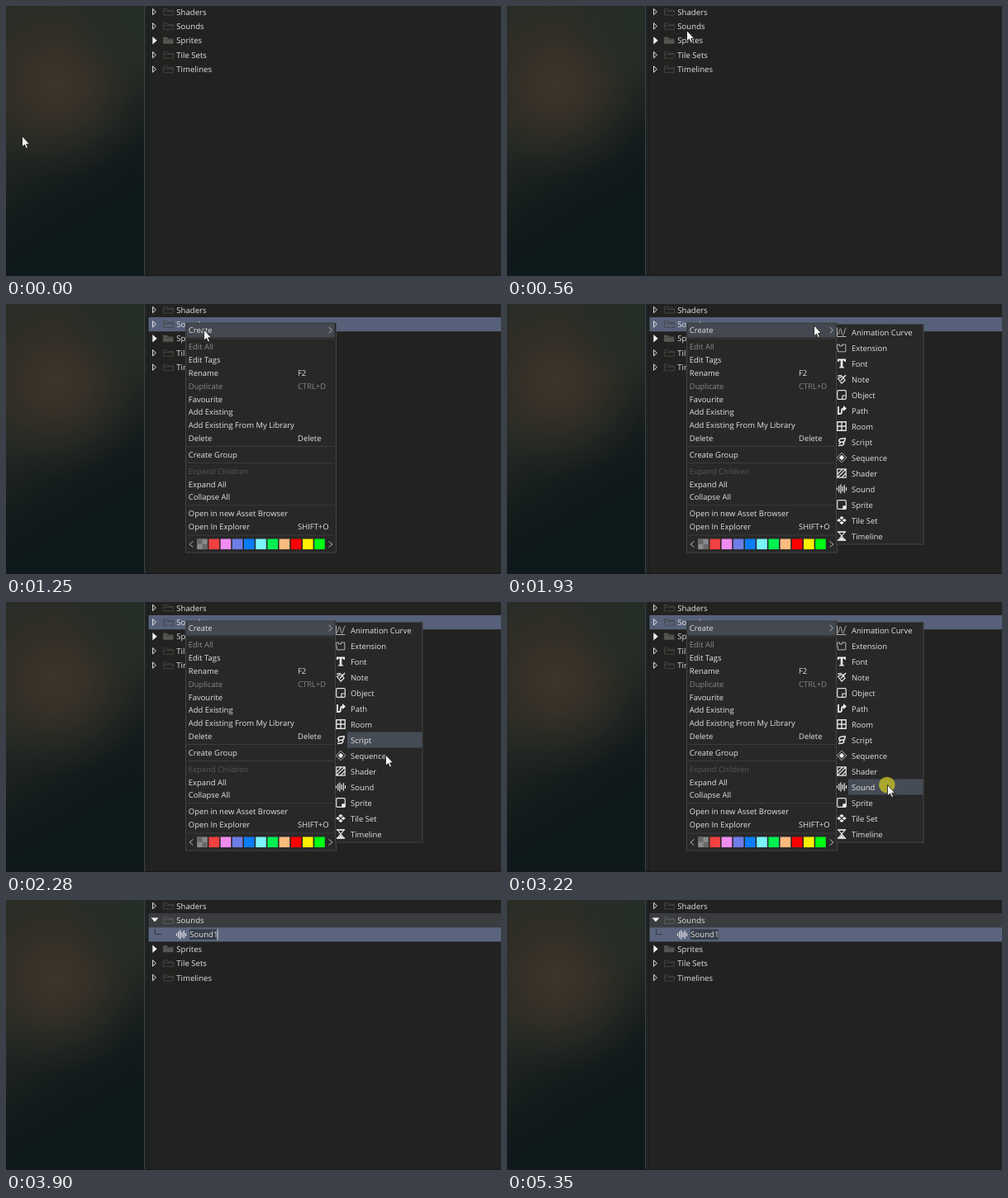
An HTML page for the animation above (5560 ms loop, 599 by 327 pixels).

```html
<!DOCTYPE html>
<html lang="en">
<head>
<meta charset="utf-8">
<title>Asset browser</title>
<style>
html, body { margin: 0; width: 100%; height: 100%; overflow: hidden; background: #222220; }
svg { display: block; width: 599px; height: 327px; }
text { font: 9.45px 'Open Sans', 'Noto Sans', sans-serif; text-rendering: geometricPrecision; white-space: pre; }
#closedTree text, #openTree text { font-size: 9.6px; }
.line { fill: none; stroke: #e4e4e4; stroke-width: 1.2; }
.solid { fill: #f0f0f0; }
.thin { fill: none; stroke: #b4b4b4; stroke-width: 1; }
</style>
</head>
<body>
<svg id="stage" viewBox="0 0 599 327" xmlns="http://www.w3.org/2000/svg">
  <defs>
    <linearGradient id="base" gradientUnits="userSpaceOnUse" x1="30" y1="40" x2="150" y2="240">
      <stop offset="0" stop-color="#2a2c26"/>
      <stop offset=".35" stop-color="#262a25"/>
      <stop offset=".6" stop-color="#1a211f"/>
      <stop offset=".8" stop-color="#121a1b"/>
      <stop offset="1" stop-color="#0e191b"/>
    </linearGradient>
    <radialGradient id="warm" gradientUnits="userSpaceOnUse" cx="60" cy="94" r="118">
      <stop offset="0" stop-color="#3d3529"/>
      <stop offset=".35" stop-color="#383128" stop-opacity=".85"/>
      <stop offset="1" stop-color="#2a2b25" stop-opacity="0"/>
    </radialGradient>
    <radialGradient id="green" gradientUnits="userSpaceOnUse" cx="160" cy="15" r="90">
      <stop offset="0" stop-color="#252e28" stop-opacity=".9"/>
      <stop offset="1" stop-color="#252e28" stop-opacity="0"/>
    </radialGradient>
  </defs>
  <rect width="599" height="327" fill="#222220"/>
  <rect width="168" height="327" fill="url(#base)"/>
  <rect width="168" height="327" fill="url(#warm)"/>
  <rect width="168" height="327" fill="url(#green)"/>
  <rect x="167" width="1" height="327" fill="#3c4242"/>
  <rect x="168" width="4" height="327" fill="#202424"/>
  <rect x="171.5" width="1" height="327" fill="#191b1b"/>
  <rect y="326" width="599" height="1" fill="#1a171b"/>
  <g id="closedTree"></g>
  <g id="openTree"></g>
  <g id="menu"></g>
  <g id="submenu"></g>
  <circle id="press" r="9.8" fill="#cfc81e" fill-opacity=".73"/>
  <path id="cursor" d="M0 0V13.2L3 10.5 5 15 7 14.2 5.2 9.8H9Z" fill="#f4f4f4" stroke="#111" stroke-width=".8"/>
</svg>
<script>
const LOOP = 5560, STEP = 70;
const $ = id => document.getElementById(id);
const rect = (x, y, w, h, fill, more = '') =>
  `<rect x="${x}" y="${y}" width="${w}" height="${h}" fill="${fill}" ${more}/>`;
const path = (d, cls = 'line', more = '') => `<path class="${cls}" d="${d}" ${more}/>`;
const label = (x, mid, s, fill = '#e2e2e2') =>
  `<text x="${x}" y="${mid + 3.6}" fill="${fill}">${s}</text>`;
const at = (x, y, body) => `<g transform="translate(${x} ${y})">${body}</g>`;

// Icons are drawn around (0, 0) in a box of about 12 px.
const frame = path('M-5.3-4Q-5.3-5.3-4-5.3H4Q5.3-5.3 5.3-4V4Q5.3 5.3 4 5.3H-4Q-5.3 5.3-5.3 4Z');
const icons = {
  'Animation Curve': path('M-5.5-5.5V5.5H5.5', 'thin') +
    path('M-5 3C-3 3-3-4-1.5-4S0 4 1.5 4 3.5-5 5.8-5', 'thin'),
  'Extension': path('M-5.3-4H-2.5V-2H.5V-4H4.8V4.8H-4.5V1.5H-5.3Z', 'thin'),
  'Font': path('M-5-5.5H5V-2H3.7L3-3.5H1.3V4L3 4.6V5.5H-3V4.6L-1.3 4V-3.5H-3L-3.7-2H-5Z', 'solid'),
  'Note': path('M-4.5-1L1-3.2 4 1.5 0 5Z') + path('M-4.8-3.8L0-4.5M-1 1.5L5-5', 'line', 'style="stroke-width:1.5"'),
  'Object': frame + path('M1 5V1H5'),
  'Path': path('M-4-5V5M-4 4H-2Q0 4 0 1.5V0Q0-2.5 3-2.5', 'line', 'style="stroke-width:1.9"') +
    path('M2-6L6-2.5 2 1Z', 'solid'),
  'Room': path('M-5.2-5.2H5.2V5.2H-5.2ZM0-5V5M-5 0H5', 'line', 'style="stroke-width:1.4"'),
  'Script': path('M4.5-4.5L-2-3.5Q-5-1-1.5 0L2 .5Q4 2 1 4L-4 4.5M4.5-4.5L3.5-1 1.5 .5M-1.5 0L-3 2.5',
    'line', 'style="stroke-width:1.6"'),
  'Sequence': path('M0-5.8L5.8 0 0 5.8-5.8 0Z', 'thin') + path('M0-3.2L3.2 0 0 3.2-3.2 0Z', 'solid'),
  'Shader': path('M-5.2-5.2H5.2V5.2H-5.2ZM-5 1L1-5M-5 5L5-5M0 5L5 0'),
  'Sound': path('M-5.5-1.5V1.5M-3.3-4V4M-1.1-5.5V5.5M1.1-3V3M3.3-4.8V4.8M5.5-2V2'),
  'Sprite': frame + path('M1.3 1.3H5.3V5.3H1.3Z', 'solid'),
  'Tile Set': [[0, -3], [-3.2, 0], [3.2, 0], [0, 3]].map(([x, y]) =>
    path(`M${x} ${y - 2}l2.7 2-2.7 2-2.7-2Z`, 'solid')).join(''),
  'Timeline': path('M-5-5H5M-5 5H5', 'line', 'style="stroke-width:1.6"') +
    path('M-4-5L4 5H-4L4-5Z') + path('M-2.5 4.5L0 1 2.5 4.5Z', 'solid')
};
const kinds = Object.keys(icons);

const rowMid = i => 7 + i * 17.4;
function folder(y, full, tint) {
  return full
    ? path(`M190 ${y - 4}h5l1 1.7h6.5v6.3h-12.5z`, '', 'fill="#555553"') +
      path(`M190 ${y - 1}h12.5`, '', 'stroke="#3c3c3a" stroke-width=".8"')
    : path(`M190.5 ${y - 3.5}h4.5l1 1.7h6.5v5.8h-12zM190.5 ${y - .6}h12`, '',
      `fill="none" stroke="${tint}" stroke-width=".9"`);
}
function branch(i, name, kind = 'shut', tint = '#454543') {
  const y = rowMid(i);
  const arrow = kind === 'open' ? path(`M175.5 ${y - 3}h9l-4.5 5z`, 'solid')
    : kind === 'full' ? path(`M177.3 ${y - 4.7}l5.4 4.7-5.4 4.7z`, 'solid')
    : path(`M177.6 ${y - 3.7}l3.8 3.7-3.8 3.7z`, 'line', 'style="stroke-width:1"');
  return arrow + folder(y, kind === 'full', tint) + label(206.3, y, name);
}

$('closedTree').innerHTML = rect(172.5, 16, 426.5, 17.2, '#566179', 'id="picked"') +
  branch(0, 'Shaders') + branch(1, 'Sounds') + branch(2, 'Sprites', 'full') +
  branch(3, 'Tile Sets') + branch(4, 'Timelines');

$('openTree').innerHTML = rect(172.5, 16, 426.5, 17.2, '#3a3c40') +
  rect(172.5, 33.2, 426.5, 17.2, '#5a657d') +
  branch(0, 'Shaders') + branch(1, 'Sounds', 'open', '#5c5e60') +
  path('M180.5 35V41.5H188', '', 'fill="none" stroke="#30374a"') +
  at(212, 42, icons.Sound) + rect(222, 35.5, 33.5, 12.5, '#363d48') + label(222.2, rowMid(2), 'Sound1') +
  rect(255.5, 35.5, 1, 13, '#d4d8e0', 'id="caret"') +
  branch(3, 'Sprites', 'full') + branch(4, 'Tile Sets') + branch(5, 'Timelines');

const dim = '#858585', edge = 'stroke="#434445"';
const entries = [
  ['Create', 31.8], ['Edit All', 51.2, '', '#8c8c8c'], ['Edit Tags', 67.3], ['Rename', 83.2, 'F2'],
  ['Duplicate', 99.1, 'CTRL+D', dim], ['Favourite', 114.9], ['Add Existing', 130.8],
  ['Add Existing From My Library', 146.6], ['Delete', 162.5, 'Delete'], ['Create Group', 182.3],
  ['Expand Children', 202, '', '#565656'], ['Expand All', 217.9], ['Collapse All', 233.7],
  ['Open in new Asset Browser', 253.4], ['Open In Explorer', 269.3, 'SHIFT+O']
];
const swatches = ['#8a8a8a', '#f04040', '#f08cf0', '#6f7de6', '#0b7df8', '#7af4fa',
  '#00f050', '#fabb7e', '#ff0000', '#fff000', '#00ff14'];
$('menu').innerHTML = rect(217.5, 23, 182, 278, '#282828', edge) +
  rect(218.5, 23.5, 179, 17, '#434851', 'id="createRow"') +
  [41.5, 172, 192, 243.3, 279.5].map(y => rect(219, y, 178, 1, '#3b3b3b')).join('') +
  entries.map(([s, y, key, fill]) => label(220.8, y, s, fill) + (key ? label(353, y, key, fill) : '')).join('') +
  path('M390.8 27.8L394.2 31.6 390.8 35.4', 'thin') +
  path('M226.5 287.5L222 291 226.5 294.5M390.5 287.5L395 291 390.5 294.5', 'thin') +
  swatches.map((c, i) => rect(231.2 + i * 14.2, 284.5, 12.6, 12.6, c)).join('') +
  rect(231.2, 284.5, 6.3, 6.3, '#686868') + rect(237.5, 290.8, 6.3, 6.3, '#686868');

$('submenu').innerHTML = rect(398.5, 24.5, 105.5, 266.5, '#282828', edge) +
  rect(413, 0, 90.5, 19, '#464c56', 'id="hover"') +
  kinds.map((s, i) => at(405, 34 + i * 19, icons[s]) + label(417, 34 + i * 19, s)).join('');

// Each key holds until the next: time, x, y.
const moves = [
  [630, 217.5, 24], [1050, 222, 25], [1120, 228, 27], [1180, 232.5, 28.5], [1250, 239.5, 31],
  [1720, 252, 30], [1790, 289, 28], [1860, 331, 26.5], [1930, 371.5, 25.7], [2000, 405, 25.5],
  [2070, 428, 48], [2140, 440, 90], [2210, 450, 136], [2280, 459.5, 185], [2350, 460, 211],
  [2430, 460.5, 221.5], [3290, 440, 120], [3360, 416.5, 50]
];
const hovers = [[0, ''], [2070, 'Animation Curve'], [2140, 'Extension'], [2210, 'Object'],
  [2280, 'Script'], [2350, 'Shader'], [2430, 'Sound']];
const held = (keys, t) => keys.filter(k => k[0] <= t).pop();

function cursorAt(t) {
  if (t >= 630) return held(moves, t).slice(1);
  const p = Math.min(8, Math.floor(t / STEP)) / 8, e = p * p * (3 - 2 * p);
  return [19.5 + 198 * e, 157.5 - 128 * e];
}
const show = (id, on) => $(id).style.display = on ? '' : 'none';
const within = (t, a, b) => t >= a && t < b;

function draw(t) {
  const [x, y] = cursorAt(t), kind = held(hovers, t)[1];
  $('cursor').setAttribute('transform', `translate(${x} ${y})`);
  $('cursor').setAttribute('opacity', t < 3690 ? 1 : Math.max(0, 1 - (Math.floor((t - 3690) / STEP) + 1) / 4));
  $('press').setAttribute('cx', x - .7);
  $('press').setAttribute('cy', y);
  $('hover').setAttribute('y', 24.5 + kinds.indexOf(kind) * 19);
  show('press', within(t, 700, 840) || within(t, 3220, 3290));
  show('picked', t >= 770);
  show('closedTree', t < 3290);
  show('openTree', t >= 3290);
  show('menu', within(t, 980, 3290));
  show('createRow', t >= 1120);
  show('submenu', within(t, 1450, 3290));
  show('hover', kind);
  show('caret', within(t, 3900, 4360) || within(t, 4890, 5350));
}

const start = performance.now();
function tick() {
  draw((performance.now() - start) % LOOP);
  requestAnimationFrame(tick);
}
tick();
</script>
</body>
</html>
```
